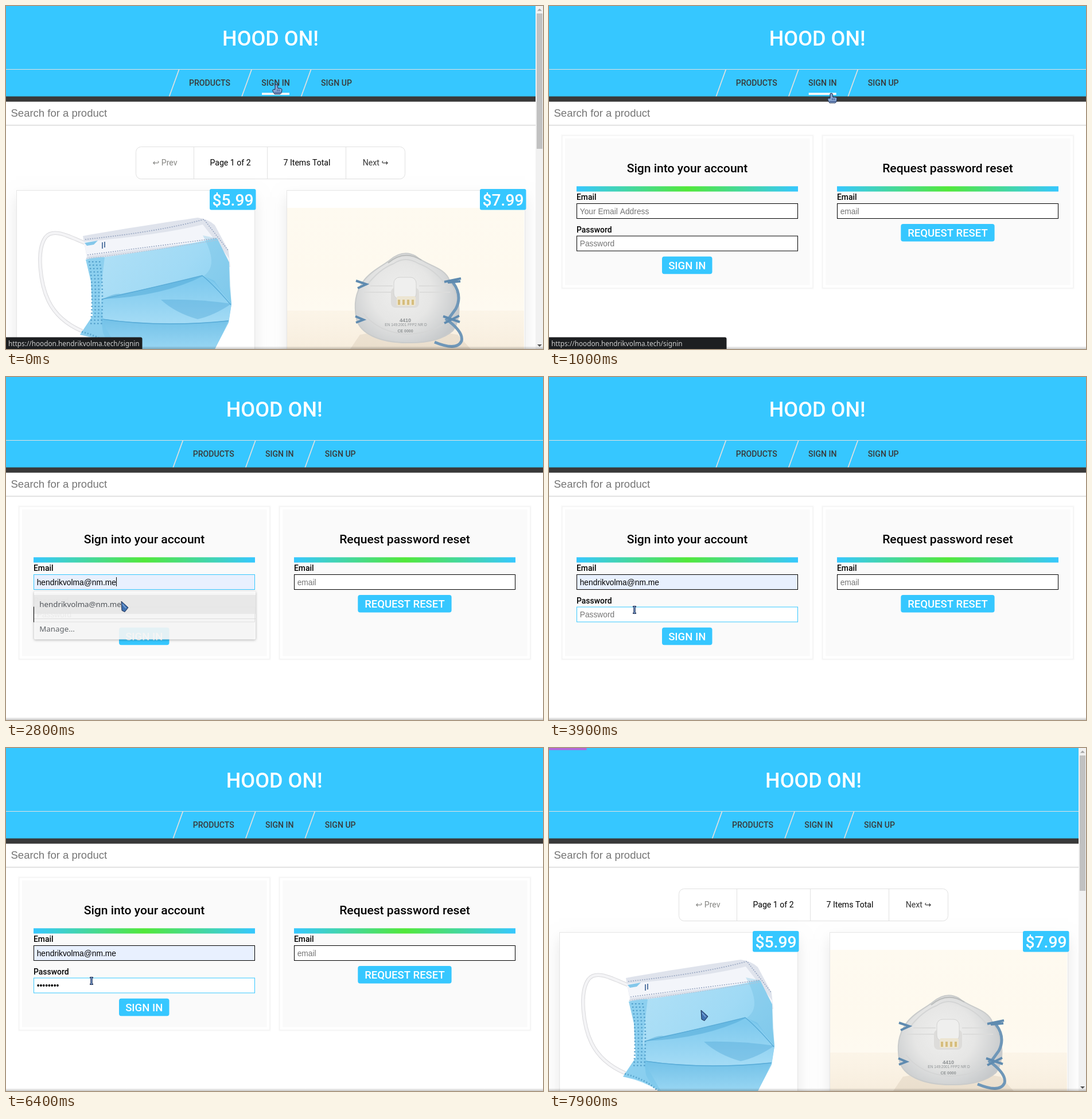
Animation of 936x598 px, one loop 8 s. Source, as an HTML page with a canvas:

```html
<!DOCTYPE html>
<html lang="en">
<head>
<meta charset="utf-8">
<title>Shop sign in</title>
<style>
html, body { margin: 0; width: 936px; height: 598px; overflow: hidden; background: #fff; }
canvas { display: block; }
</style>
</head>
<body>
<canvas id="stage" width="936" height="598"></canvas>
<script>
const ctx = document.getElementById('stage').getContext('2d');
const W = 936, H = 598, LOOP = 8000;
const BLUE = '#36c7ff', INK = '#393939', LINE = '#e1e1e1', HINT = '#757575';
const UI = 'Roboto, "DejaVu Sans", sans-serif';
const FIELD = '"Liberation Sans", Arial, sans-serif';
const NOTO = '"Noto Sans", sans-serif';
const EMAIL = 'hendrikvolma@nm.me';
const URL_TEXT = 'https://hoodon.hendrikvolma.tech/signin';
const KEYS = [4100, 4400, 4600, 4800, 4900, 5300, 5600, 5800];

function rect(x, y, w, h, color) {
  ctx.fillStyle = color;
  ctx.fillRect(x, y, w, h);
}

function round(x, y, w, h, r, color) {
  ctx.beginPath();
  ctx.roundRect(x, y, w, h, r);
  ctx.fillStyle = color;
  ctx.fill();
}

function text(str, x, y, font, color, align = 'left') {
  ctx.font = font;
  ctx.fillStyle = color;
  ctx.textAlign = align;
  ctx.fillText(str, x, y);
}

function fill(d, color) {
  ctx.fillStyle = color;
  ctx.fill(new Path2D(d));
}

function stroke(d, color, width, dash = []) {
  ctx.strokeStyle = color;
  ctx.lineWidth = width;
  ctx.setLineDash(dash);
  ctx.stroke(new Path2D(d));
  ctx.setLineDash([]);
}

function stops(g, colors) {
  colors.forEach((c, i) => g.addColorStop(i / (colors.length - 1), c));
  return g;
}

function gradient(x0, y0, x1, y1, ...colors) {
  return stops(ctx.createLinearGradient(x0, y0, x1, y1), colors);
}

function radial(x, y, r, ...colors) {
  return stops(ctx.createRadialGradient(x, y, 0, x, y, r), colors);
}

function shadow(color, blur, dy) {
  ctx.shadowColor = color;
  ctx.shadowBlur = blur;
  ctx.shadowOffsetY = dy;
}

function header(width, dx, underline) {
  rect(0, 0, width, 158, BLUE);
  text('HOOD ON!', 461 + dx, 69, '500 36px ' + UI, '#fff', 'center');
  rect(0, 110, width, 1, LINE);
  for (const x of [301.5, 428, 531.5]) stroke(`M${x + dx} 111L${x - 17 + dx} 158`, LINE, 1.7);
  const font = '500 14.1px ' + UI;
  text('PRODUCTS', 355 + dx, 139, font, INK, 'center');
  text('SIGN IN', 470 + dx, 139, font, INK, 'center');
  text('SIGN UP', 576 + dx, 139, font, INK, 'center');
  if (underline) rect(446 + dx, 151.3, 48, 3.7, '#fafafa');
  rect(0, 157.6, width, 9.2, INK);
  text('Search for a product', 8.5, 193, '18.5px ' + FIELD, HINT);
  rect(0, 207, width, 1.6, '#dcdcdc');
}

function pager() {
  ctx.beginPath();
  ctx.roundRect(226.5, 245.5, 469, 56, 9);
  ctx.strokeStyle = LINE;
  ctx.lineWidth = 1;
  ctx.stroke();
  for (const x of [327, 455, 592]) rect(x, 246, 1, 55, LINE);
  const font = '14.1px ' + UI;
  text('↩ Prev', 277, 278, font, '#868683', 'center');
  text('Page 1 of 2', 391, 278, font, '#000', 'center');
  text('7 Items Total', 524.5, 278, font, '#000', 'center');
  text('Next ↪', 644, 278, font, INK, 'center');
}

function card(x) {
  shadow('rgba(0,0,0,.09)', 24, 12);
  rect(x, 321, 416, 330, '#fff');
  shadow('transparent', 0, 0);
  ctx.strokeStyle = '#e6e6e6';
  ctx.lineWidth = 1;
  ctx.strokeRect(x + .5, 321.5, 415, 330);
}

function price(x, label) {
  round(x, 319, 80.5, 36.5, 3, BLUE);
  text(label, x + 40.5, 348, '500 28.3px ' + UI, '#fff', 'center');
}

function pleatedMask() {
  const loop = 'M137 413C112 403 83 386 69 403C52 426 60 485 74 514C88 543 112 558 133 567';
  stroke(loop, '#d9d9dc', 6.5);
  stroke(loop, '#f4f4f6', 4.5);
  fill('M134 401C205 388 280 377 334 369Q352 371 364 382L388 427L391 455L142 443Z', '#dfe3ec');
  fill('M136 411Q270 399 343 381L389 440L390 456L368 409Q260 420 141 436Z', '#f3f5fa');
  fill('M139 442Q260 427 368 405L389 447L390 488L393 520L388 552L364 598H192Q166 581 129 573L151 540L148 480Z',
    gradient(160, 420, 380, 598, '#b0e0f6', '#a0daf5', '#83cdef'));
  // shade below each fold, fading downwards
  fill('M166 512Q260 492 343 470L363 479L393 520L388 549Q270 560 166 544Z',
    gradient(0, 480, 0, 552, '#7fcaee', '#a3dbf5'));
  fill('M166 545Q270 560 388 548L364 598H192Q175 585 169 570Z',
    gradient(0, 548, 0, 598, '#74c2e8', '#98d6f3'));
  fill('M343 400L368 405L389 447L393 520L363 482L345 470Q372 452 343 400Z', 'rgba(93,178,220,.28)');
  fill('M270 512Q330 510 393 519Q362 540 334 546Q295 535 270 512Z', 'rgba(66,158,208,.35)');
  fill('M168 511Q190 500 200 502Q260 490 345 470Q275 506 168 511Z', 'rgba(66,158,208,.4)');
  stroke('M168 511Q265 489 342 470Q362 486 392 521M168 546Q270 561 388 549', '#59acd8', 1.5);
  fill('M139 442Q158 437 172 438L163 512L172 558L195 598Q166 579 129 573L151 540L148 480Z', 'rgba(120,198,235,.6)');
  stroke('M138 407Q270 393 345 372L388 427M142 434Q265 418 368 405', '#9caac4', 1.7, [2, 2]);
  stroke('M140 440Q270 425 368 408', '#b5c2d4', 1.5, [2, 2]);
  for (let i = 0; i < 4; i++) {
    const x = 145 + i * 6;
    stroke(`M${x} 445Q${x + 8} 485 ${x + 3} 558`, '#4e9cc9', 2.6, [2, 4]);
  }
  stroke('M132 568Q170 578 190 598', '#5aa7d0', 3, [2, 3]);
  fill('M137 413L160 409L153 416L141 418Z', '#84c7ea');
  rect(167, 412, 2, 11, '#5c7ca6');
  rect(171, 411, 2, 10, '#5c7ca6');
}

function cupMask() {
  rect(490, 352, 413, 246, gradient(0, 352, 0, 598, '#fefaf0', '#fef9ee', '#fefbf3'));
  rect(490, 531, 413, 67, gradient(0, 531, 0, 598, 'rgba(250,241,226,.6)', '#f7eddd'));
  fill('M617 573Q700 558 787 573L810 598H600Z', 'rgba(166,142,116,.16)');
  const body = 'M622 481C635 462 660 451 669 443Q692 424 714 436C736 454 764 455 773 478C791 505 796 542 779 566Q754 588 700 587C649 587 617 570 611 546C606 520 609 500 622 481Z';
  fill(body, radial(690, 500, 105, '#efefee', '#e6e6e5', '#c6c9cb'));
  stroke(body, '#c9cbcb', 2);
  stroke('M628 488Q650 459 676 449Q696 435 719 449Q745 458 765 484M622 535Q650 570 700 572Q757 570 780 537', '#d4d5d5', 2);
  stroke('M666 448Q694 424 724 443', '#bbbdbc', 2);
  stroke('M635 488H674M720 488H765M624 499H672M721 499H774', '#dcdcdb', 2);
  stroke('M779 482Q796 505 784 528L768 550M766 545Q798 568 794 584Q786 602 747 586', '#6f97b8', 5);
  round(671, 491, 49, 35, 8, '#dddcda');
  round(676, 473, 39, 38, 10, '#efefee');
  ctx.strokeStyle = '#d2d2d1';
  ctx.lineWidth = 1;
  ctx.stroke();
  round(681, 506, 33, 17, 3, '#ece5d2');
  for (let i = 0; i < 4; i++) rect(683 + i * 8, 512, 4, 9, '#d6bd7c');
  const grey = '#8d9193';
  text('4410', 696, 551, 'bold 9px ' + FIELD, grey, 'center');
  text('EN 149:2001 FFP2 NR D', 697, 558, '6.5px ' + FIELD, grey, 'center');
  text('CE 0000', 696, 569, 'bold 7px ' + FIELD, grey, 'center');
  stroke('M610 479L628 485L613 492M609 541L623 547L610 552M764 481L793 475M770 482L792 480M762 541L791 551M764 553L790 540', '#5f8bb0', 4);
}

function scrollbar() {
  rect(923, 0, 13, H, '#f1f1f1');
  rect(925, 13, 10, 236, '#c1c1c1');
  fill('M926 8.5L930 4.5L934 8.5Z', '#a3a3a3');
  fill('M926 590L930 594L934 590Z', '#505050');
}

function shopPage(underline) {
  header(923, 0, underline);
  pager();
  card(18);
  card(489);
  pleatedMask();
  cupMask();
  price(355, '$5.99');
  price(826, '$7.99');
  scrollbar();
}

function panel(dx, title) {
  round(20.5 + dx, 223.5, 441.5, 270.5, 2, '#fbfbfb');
  round(22 + dx, 225, 438.5, 267.5, 1, '#f4f4f4');
  rect(23.5 + dx, 226.5, 435.5, 264.5, '#fff');
  rect(28 + dx, 231, 426.5, 255.5, '#fafafa');
  text(title, 241 + dx, 290, '500 21.1px ' + UI, '#000', 'center');
  rect(48 + dx, 314.3, 386, 9.2, gradient(48 + dx, 0, 434 + dx, 0, BLUE, '#52e83a', BLUE));
}

function label(str, x, y) {
  text(str, x, y, '500 13.9px ' + UI, '#000');
}

function input(x, y, str, hint, focus, bg = '#fff') {
  rect(x, y, 386, 27, bg);
  ctx.strokeStyle = focus ? BLUE : '#000';
  ctx.lineWidth = 1;
  ctx.strokeRect(x + .5, y + .5, 385, 26);
  text(str || hint, x + 5.7, y + 18.5, '13.8px ' + FIELD, str ? '#000' : HINT);
  return x + 5.5 + (str ? ctx.measureText(str).width : 0);
}

function button(str, x, y, w) {
  round(x, y, w, 30.5, 4, BLUE);
  text(str, x + w / 2, y + 22.3, '500 18.5px ' + UI, '#fff', 'center');
}

function dropdown(t) {
  ctx.save();
  ctx.globalAlpha = t < 2800 ? 1 : t < 2900 ? .88 : .4;
  ctx.translate(t < 2800 ? 0 : 1, 0);
  shadow('rgba(0,0,0,.35)', 4, 1);
  round(48, 373.5, 386, 84, 2, '#fff');
  shadow('transparent', 0, 0);
  if (t >= 2400) rect(48, 380, 386, 33, '#e6e6e6');
  text(EMAIL, 57.3, 400.5, '500 13.3px ' + NOTO, '#3a3f44');
  rect(48, 421, 386, 1, '#dadada');
  text('Manage...', 57.3, 443.5, '13.3px ' + NOTO, '#4a4e53');
  ctx.restore();
}

function signInPage(t) {
  header(W, 6.7, t < 2100);
  panel(0, 'Sign into your account');
  panel(454, 'Request password reset');

  const filled = t >= 2400;
  const onEmail = t >= 2000 && t < 3300;
  const onPass = t >= 3300 && t < 7400;
  const dots = '•'.repeat(KEYS.filter(k => t >= k).length);

  label('Email', 48, 338);
  const mailEnd = input(48, 344, filled ? EMAIL : '', 'Your Email Address', onEmail, filled ? '#e8f0fe' : '#fff');
  if (onEmail && (t < 2400 || t >= 2800)) rect(Math.round(mailEnd), 349, 1, 16, '#000');
  label('Password', 48, 395);
  const passEnd = input(48, 400.5, dots, 'Password', onPass);
  const blinkOn = t < 3900 || (t >= 4100 && t < 6400);
  if (onPass && blinkOn) rect(Math.round(passEnd), 406, 1, 16, '#000');
  button('SIGN IN', 197, 436.7, 87.5);

  label('Email', 502, 338);
  input(502, 344, '', 'email', false);
  button('REQUEST RESET', 613.3, 380, 163.3);

  if (t >= 2000 && t < 3000) dropdown(t);
}

function statusBar(width) {
  round(0, 577.5, width, 21, [0, 3, 0, 0], '#1d1f21');
  text(URL_TEXT, 4, 592.5, '11.8px ' + NOTO, '#cdcdcd');
}

const shapes = {
  hand: ['M-2 1Q0 -1 2 1L3 7Q10 6 10 10L9 15L7 17H-3L-6 12Q-7 8 -2 9Z', '#86a3d0'],
  arrow: ['M0 0L12 11L6 18.5L1 16Z', '#3e70b0'],
  beam: ['M-2.5 -6.5H2.5V-5H1.2V5H2.5V6.5H-2.5V5H-1.2V-5H-2.5Z', '#7ea3da']
};

function drawCursor(kind, x, y) {
  const [d, color] = shapes[kind];
  ctx.save();
  ctx.translate(x, y);
  fill(d, color);
  stroke(d, '#1a2a4c', 1);
  if (kind === 'hand') stroke('M2 9V12M5 9V12M-3 14.5H8', '#2b437c', 1);
  if (kind === 'arrow') stroke('M2 5L8 12', '#7fa9dc', 1.5);
  ctx.restore();
}

function glide(t, start, end, a, b) {
  const p = Math.min(1, Math.max(0, (t - start) / (end - start)));
  return a.map((v, i) => v + (b[i] - v) * p);
}

function cursor(t) {
  if (t < 2000) return ['hand', ...glide(t, 600, 1000, [471, 136.5], [492, 152])];
  if (t < 2400) return ['beam', 281, 356];
  if (t < 3000) return ['arrow', ...glide(t, 2300, 2600, [272, 378], [201, 391])];
  if (t < 3100) return ['arrow', 176, 400];
  if (t < 6900) return ['beam', 149, 406];
  if (t < 7800) {
    const [x, y] = glide(t, 6800, 7300, [149, 406], [265, 457]);
    return [y < 428 ? 'beam' : y < 437 ? 'arrow' : 'hand', x, y];
  }
  return ['arrow', 265, 457];
}

function draw(t) {
  rect(0, 0, W, H, '#fff');
  if (t < 500 || t >= 7800) shopPage(t < 500);
  else signInPage(t);
  rect(0, 593, W, 5, gradient(0, 593, 0, 598, 'rgba(0,0,0,0)', 'rgba(0,0,0,.22)'));
  if (t < 2000) statusBar(t < 500 ? 237.5 : 309.5);
  if (t >= 7900) rect(0, 0, 65.5, 3.6, '#b566d8');
  drawCursor(...cursor(t));
}

const begin = performance.now();
function tick() {
  const ms = (performance.now() - begin) % LOOP;
  draw(Math.floor(ms / 100) * 100);
  requestAnimationFrame(tick);
}
tick();
</script>
</body>
</html>
```
